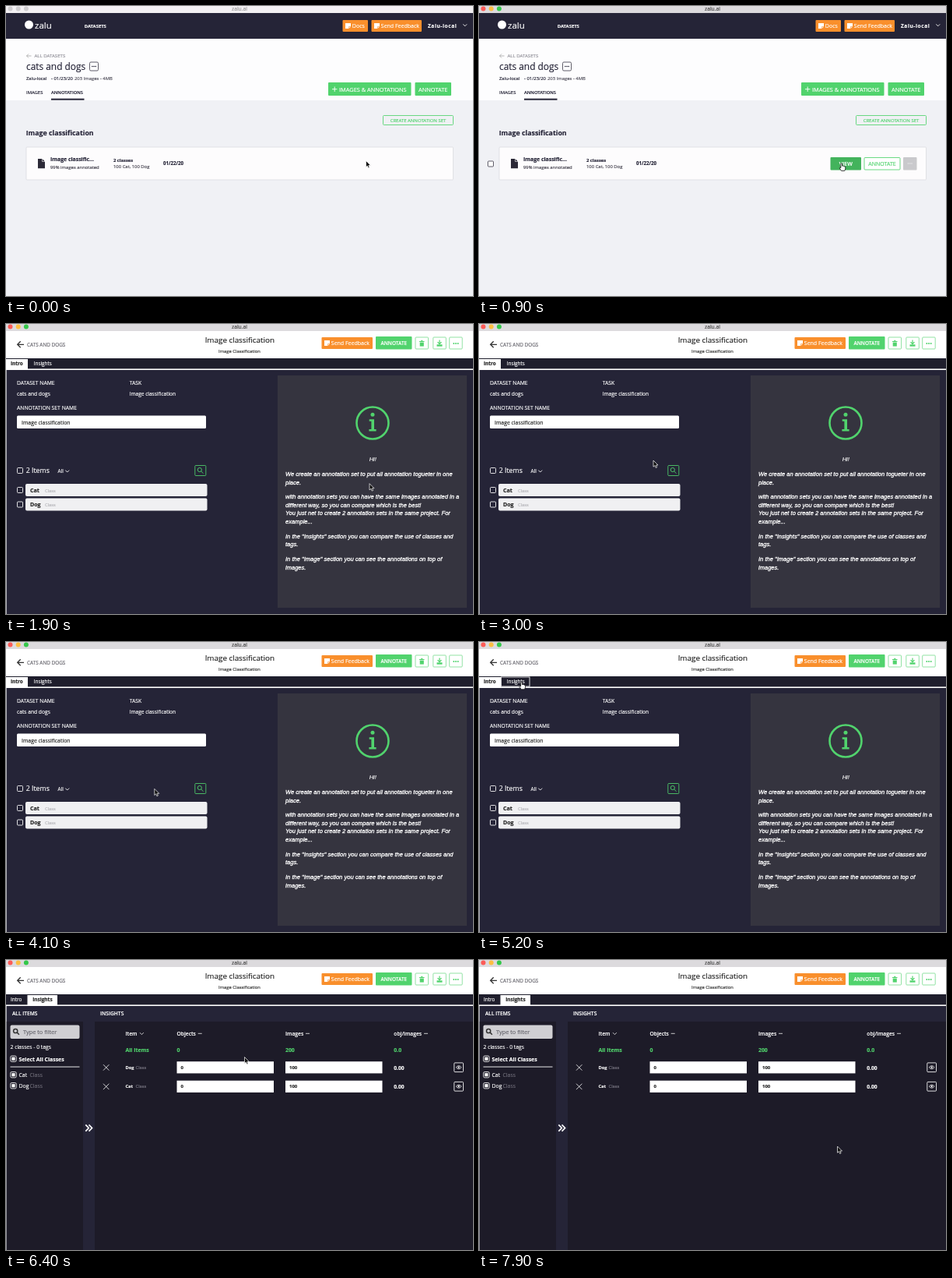
Recreate the animation shown at these times as an HTML page. Size 600 by 372 pixels, loop 8000 ms.

```html
<!DOCTYPE html>
<html lang="en">
<head>
<meta charset="utf-8">
<title>Annotation sets</title>
<style>
  html, body { margin: 0; width: 100%; height: 100%; overflow: hidden; background: #fff; }
  svg { display: block; width: 600px; height: 372px; font-family: "Open Sans", sans-serif; }
  text { white-space: pre; stroke-width: .16px; }
</style>
</head>
<body>
<svg id="stage" viewBox="0 0 600 372"></svg>
<script>
const GREEN = '#51d36d', INK = '#252437', ORANGE = '#f98f2c', DEEP = '#1d1b28';

const text = (x, y, str, size, fill = '#fff', attrs = '') =>
  `<text x="${x}" y="${y}" font-size="${size}" fill="${fill}" stroke="${fill}" ${attrs}>${str}</text>`;
const bold = (x, y, str, size, fill, weight = 700) =>
  text(x, y, str, size, fill, `font-weight="${weight}"`);
const centered = (x, y, str, size, fill, weight = 400) =>
  text(x, y, str, size, fill, `text-anchor="middle" font-weight="${weight}"`);
const box = (x, y, w, h, fill, stroke = 'none', r = 0) =>
  `<rect x="${x}" y="${y}" width="${w}" height="${h}" rx="${r}" fill="${fill}" stroke="${stroke}" stroke-width=".85"/>`;
const line = (d, stroke = '#fff', w = 1, fill = 'none') =>
  `<path d="${d}" stroke="${stroke}" stroke-width="${w}" fill="${fill}"/>`;
const dot = (x, y, r, fill) => `<circle cx="${x}" cy="${y}" r="${r}" fill="${fill}"/>`;
const dots = (x, y, fill, gap = 2.5, r = .9) => [-gap, 0, gap].map(d => dot(x + d, y, r, fill)).join('');
const chevron = (x, y, color) => line(`M${x} ${y}l2.4 2.4 2.4-2.4`, color, .9);
const lens = (x, y, color, w = 1) =>
  `<circle cx="${x}" cy="${y}" r="2.6" fill="none" stroke="${color}" stroke-width="${w}"/>` +
  line(`M${x + 1.9} ${y + 1.9}l2.8 2.8`, color, w);
const group = (id, ...parts) => `<g id="${id}">${parts.join('')}</g>`;

const noteButton = (x, y, w, label) =>
  box(x, y, w, 15, ORANGE, 'none', 1) +
  line(`M${x + 3.5} ${y + 4}h7v4.5l-2.5 2.5h-4.5z`, 'none', 0, '#fff') +
  line(`M${x + 8} ${y + 11}v-2.5h2.5`, ORANGE, .6) +
  text(x + 12.3, y + 10.2, label, 7);

const titleBar = (id, bar, ink, lights) => group(id,
  box(0, 0, 600, 9, bar),
  lights.map((c, i) => dot(5.5 + i * 10.2, 3.5, 3, c)).join(''),
  centered(300, 6, 'zalu.ai', 6.7, ink));

const listPage = group('list',
  box(0, 0, 600, 372, '#f0f1f5'), box(0, 42, 600, 79, '#fdfdfe'), box(0, 9, 600, 33, INK),
  dot(29.5, 24, 5.5, '#fff'), text(37, 29, 'zalu', 11.5),
  bold(100.7, 27.7, 'DATASETS', 5.9),
  noteButton(432.5, 18, 32.5, 'Docs'), noteButton(469.5, 18, 64.5, 'Send Feedback'),
  text(542, 27.7, 'Zalu-local', 6.5, '#fff', 'font-weight="700" letter-spacing=".6"'),
  chevron(587.3, 23.4, '#fff'),
  line('M32.5 64h-6M29 61.5l-2.5 2.5 2.5 2.5', '#999', .7),
  text(36.5, 66.3, 'ALL DATASETS', 6.1, '#94939b'),
  text(26, 81.5, 'cats and dogs', 11.9, INK),
  box(107.5, 72, 11, 11, 'none', '#44424e', 1.5), dots(113, 77.5, INK, 2.2, .8),
  text(26, 94.5, 'Zalu-local', 5.9, INK), text(58, 94.5, '- 01/23/20', 5.9, INK),
  text(88, 94.5, '203 Images - 4MB', 5.9, '#55535f'),
  text(26, 113, 'IMAGES', 5.9, INK), bold(58, 113, 'ANNOTATIONS', 5.8, INK, 600),
  box(58, 118.7, 42.5, 2, INK),
  box(414, 98, 106.5, 17, GREEN, 'none', 1), line('M419 106.7h6.4m-3.2-3.2v6.4', '#fff', .9),
  text(428, 109.5, 'IMAGES &amp; ANNOTATIONS', 7.4),
  box(525.5, 98, 46.5, 17, GREEN, 'none', 1), centered(548.7, 109.5, 'ANNOTATE', 7.4),
  box(484.5, 140.5, 90, 12, 'none', GREEN, 1), centered(529.5, 148.6, 'CREATE ANNOTATION SET', 6, GREEN),
  bold(25.7, 166.3, 'Image classification', 8.8, INK),
  box(26, 181, 548.5, 42, '#fdfcfd', '#dcdde2', 1),
  line('M41 196h5.5l3.5 3.5v8.7h-9z', 'none', 0, '#2b2937'), line('M46.5 196v3.5h3.5', '#fff', .6),
  bold(57, 199.3, 'Image classific...', 6.9, INK), text(57, 208.6, '99% images annotated', 5.9, '#44424e'),
  bold(138, 199.6, '2 classes', 5.8, INK), text(138, 208.3, '100 Cat, 100 Dog', 5.9, '#44424e'),
  bold(202, 204.2, '01/22/20', 6.1, INK),
  group('rowTools',
    box(11.5, 199, 7, 7, '#fff', '#44424e', 1),
    box(451.5, 194, 39.5, 16.5, '#43b35c', 'none', 1), centered(471.3, 205, 'VIEW', 7, '#fff', 600),
    box(495, 194.5, 46, 15.5, '#fff', GREEN, 1), centered(518, 205, 'ANNOTATE', 7, GREEN),
    box(545, 194, 17.5, 16.5, '#c9c9cc', 'none', 1), dots(553.7, 202, '#eee', 2.3, .7)));

const detailHeader = group('header',
  box(0, 0, 600, 372, INK), box(0, 9, 600, 35, '#fff'),
  line('M23 26.3h-8M18.7 22.3l-4 4 4 4', '#333', 1.3),
  text(27, 28.5, 'CATS AND DOGS', 6.4, '#66656d'),
  centered(300.3, 24, 'Image classification', 9.85, '#222'),
  centered(300, 36.6, 'Image Classification', 5.85, '#333'),
  noteButton(405.5, 17, 65.5, 'Send Feedback'),
  box(475, 16, 46.5, 16.5, GREEN, 'none', 1), centered(498.3, 26.8, 'ANNOTATE', 6.5, '#fff', 600),
  [526, 548.8, 569.7].map(x => box(x, 17, 16.5, 15, '#fff', '#7fdd94', 1)).join(''),
  line('M531 22.5h6.5M533 21.3h2.5', GREEN, 1), box(531.7, 23.6, 5.1, 5, GREEN),
  line('M557 20.5v5.2m-2.5-2.5l2.5 2.5 2.5-2.5', GREEN, 1.2), box(553.5, 26.3, 7, 2.4, GREEN),
  dots(578, 25, GREEN, 2.7, 1),
  box(0, 44.3, 600, 13.7, '#1f1e2c'), box(0, 57.4, 600, 1.6, '#fff'), box(0, 59, .8, 313, '#d5d5da'));

const classRow = (y, name) =>
  box(14.5, y + 4.5, 7, 7, 'none', '#fff', 1) + box(25, y, 233.5, 16, '#f0f0f2', 'none', 2) +
  bold(31, y + 10.7, name, 7, '#222') + text(50, y + 10.5, 'Class', 5.8, '#b5b5ba');

const notes = [
  [195, 'We create an annotation set to put all annotation togueter in one'], [205.7, 'place.'],
  [224.3, 'with annotation sets you can have the same images annotated in a'],
  [234.7, 'different way, so you can compare which is the best!'],
  [244.9, 'You just net to create 2 annotation sets in the same project. For'], [256, 'example...'],
  [274.5, 'In the "Insights" section you can compare the use of classes and'], [284.7, 'tags.'],
  [303.6, 'In the "Image" section you can see the annotations on top of'], [314.5, 'images.']];

const introPage = group('intro',
  box(0, 45, 28, 13, '#fff'), bold(6, 53.2, 'Intro', 6.4, '#222'),
  group('tabHover', box(28.5, 45, 36.5, 12, 'none', '#fff')),
  text(35.7, 53.2, 'Insights', 6.4),
  text(14, 78, 'DATASET NAME', 6.8), text(158.7, 78, 'TASK', 6.8),
  text(14, 92.3, 'cats and dogs', 6.7), text(158.7, 92.3, 'Image classification', 6.55),
  text(14, 110.3, 'ANNOTATION SET NAME', 6.8),
  box(14, 117.5, 243, 16.5, '#fff', 'none', 1.5), text(20, 128.5, 'Image classification', 6.9, '#222'),
  box(14.5, 184.5, 7, 7, 'none', '#fff', 1), text(25.7, 191.2, '2 Items', 8.8),
  text(66.5, 190.8, 'All', 6.4), chevron(76.3, 187.6, '#fff'),
  box(242.8, 181.5, 14, 13, 'none', GREEN, 1), lens(248.8, 187, GREEN, .9),
  classRow(205, 'Cat'), classRow(223.5, 'Dog'),
  box(349, 66, 243, 298, '#35343f'),
  `<circle cx="471" cy="127" r="20.5" fill="none" stroke="${GREEN}" stroke-width="2.6"/>`,
  dot(471, 116.3, 2.5, GREEN),
  line('M466.7 122.3h6.3v12.6h2.6v2.5h-9.2v-2.5h3v-10.1h-2.7z', 'none', 0, GREEN),
  `<g font-family="'Liberation Sans', Arial, sans-serif" font-style="italic" style="font-synthesis:none">`,
  centered(471.3, 176.3, 'Hi!', 7.55), notes.map(([y, s]) => text(359, y, s, 7.55, '#fff', 'style="stroke-width:.3px"')).join(''), '</g>');

const checked = y => box(5.8, y + .5, 7.4, 7.4, 'none', '#fff', 1.5) + box(7.4, y + 2.1, 4.2, 4.2, '#fff');
const filterRow = (y, name) =>
  checked(y) + text(16.5, y + 6.9, name, 6.9) + text(30.5, y + 6.9, 'Class', 6.9, '#6c6a75');
const column = (x, label, dashX, total) =>
  bold(x, 96.6, label, 6.7, '#fff', 600) + line(`M${dashX} 94.3h5`, '#ddd', .9) + bold(x, 118, total, 6.9, GREEN);
const tableRow = (y, name) =>
  line(`M125 ${y - 3.5}l7.4 7.4m0-7.4l-7.4 7.4`, '#fff', .8) +
  bold(153.5, y + 2.2, name, 5.7) + text(166.5, y + 2.2, 'Class', 5.8, '#777580') +
  [[219.5, '0'], [359, '100']].map(([x, v]) =>
    box(x, y - 7.5, 124.5, 15.2, '#fff') + bold(x + 5, y + 2.2, v, 6, '#222')).join('') +
  bold(498.3, y + 2.8, '0.00', 6.7) + box(575.8, y - 5.8, 11.7, 11.7, 'none', '#fff', 1) +
  line(`M578.3 ${y}q3.4-4 6.8 0q-3.4 4-6.8 0z`, '#fff', .8) + dot(581.7, y, 1.1, '#fff');

const insightsPage = group('insights',
  box(27.5, 45, 38.5, 13, '#fff'), text(6, 53.2, 'Intro', 6.4), bold(34.2, 53.2, 'Insights', 6.45, '#222'),
  box(.8, 79, 98.2, 293, DEEP), box(114, 79, 486, 293, DEEP),
  bold(8, 71, 'ALL ITEMS', 6.6, '#fff', 600), bold(121, 71, 'INSIGHTS', 6.7, '#fff', 600),
  box(5.5, 83.5, 89, 17.5, '#d0cfd3', 'none', 2), lens(12.2, 91, '#333', 1.5),
  text(22, 94.7, 'Type to filter', 7.4, '#66656d'),
  text(5.5, 114, '2 classes - 0 tags', 6.8),
  checked(122.5), bold(16.5, 129.5, 'Select All Classes', 6.9),
  box(5.5, 136.6, 89, .9, '#fff'), filterRow(143, 'Cat'), filterRow(157, 'Dog'),
  line('M102.3 211.3l4 4.2-4 4.2M106.5 211.3l4 4.2-4 4.2', '#fff', 1.7),
  bold(153.5, 96.6, 'Item', 6.7, '#fff', 600), chevron(172, 93.2, '#ddd'), bold(153.5, 118, 'All Items', 6.9, GREEN),
  column(219.5, 'Objects', 246.7, '0'), column(359, 'Images', 385, '200'), column(498.3, 'obj/images', 537, '0.0'),
  tableRow(137.7, 'Dog'), tableRow(162.2, 'Cat'),
  '<rect id="veil" x="114" y="79" width="486" height="101" fill="#69676e"/>');

const pointer = group('pointer',
  group('arrow', line('M0 0V8.2L1.9 6.5 3.1 9.4 4.6 8.8 3.4 6H6z', '#fff', .7, '#111')),
  group('hand', line('M.1 .7Q1.1-.3 1.9.7V3.6Q2.8 3 3.4 3.8Q4.3 3.3 4.8 4.2Q6 4 6 5.2V7.3L5 9.8H.8L-1.6 6.3Q-1.4 5.2.1 6z', '#111', .8, '#fff')));

document.getElementById('stage').innerHTML =
  listPage + group('detail', detailHeader, introPage, insightsPage) +
  titleBar('idleBar', '#f2f0f2', '#999', Array(3).fill('#cfcdcf')) +
  titleBar('activeBar', '#dcdadd', '#444', ['#fc5b57', '#fdbe41', '#34c84a']) + pointer;

const $ = id => document.getElementById(id);
const show = (id, on) => $(id).setAttribute('display', on ? 'inline' : 'none');

// Moments when the picture switches
const FOCUS = 100, ROW_HOVER = 700, OPEN_SET = 1800, TAB_HOVER = 4900, OPEN_TAB = 5300, LEAVE_TAB = 5700;

// Pointer stops: time, x, y
const stops = [
  [0, 462.5, 198.5], [600, 462.5, 198.5], [1200, 467, 204.7], [2000, 467, 204.7], [2900, 224, 175],
  [3000, 224, 175], [3300, 212, 225], [4200, 190, 187], [4900, 53.5, 51], [5600, 53.5, 51],
  [6300, 306.5, 124.5], [6800, 306.5, 124.5], [7600, 460.5, 239], [8000, 460.5, 239]];

function pointerAt(t) {
  const i = stops.findIndex(s => s[0] > t);
  const [t0, x0, y0] = stops[i - 1], [t1, x1, y1] = stops[i];
  const p = (t - t0) / (t1 - t0), e = p * p * (3 - 2 * p);
  return [x0 + (x1 - x0) * e, y0 + (y1 - y0) * e];
}

function draw(now) {
  const t = Math.floor(now % 8000 / 100) * 100;
  const within = (a, b) => t >= a && t < b;
  const hand = within(ROW_HOVER, OPEN_SET) || within(TAB_HOVER, LEAVE_TAB);
  show('idleBar', t < FOCUS);
  show('activeBar', t >= FOCUS);
  show('list', t < OPEN_SET);
  show('rowTools', t >= ROW_HOVER);
  show('detail', t >= OPEN_SET);
  show('intro', t < OPEN_TAB);
  show('tabHover', t >= TAB_HOVER);
  show('insights', t >= OPEN_TAB);
  $('veil').setAttribute('opacity', .62 * Math.max(0, Math.min(1, (5800 - t) / 300)));
  show('arrow', !hand);
  show('hand', hand);
  $('pointer').setAttribute('transform', `translate(${pointerAt(t)})`);
}

const start = performance.now();
(function tick() {
  draw(performance.now() - start);
  requestAnimationFrame(tick);
})();
</script>
</body>
</html>
```
